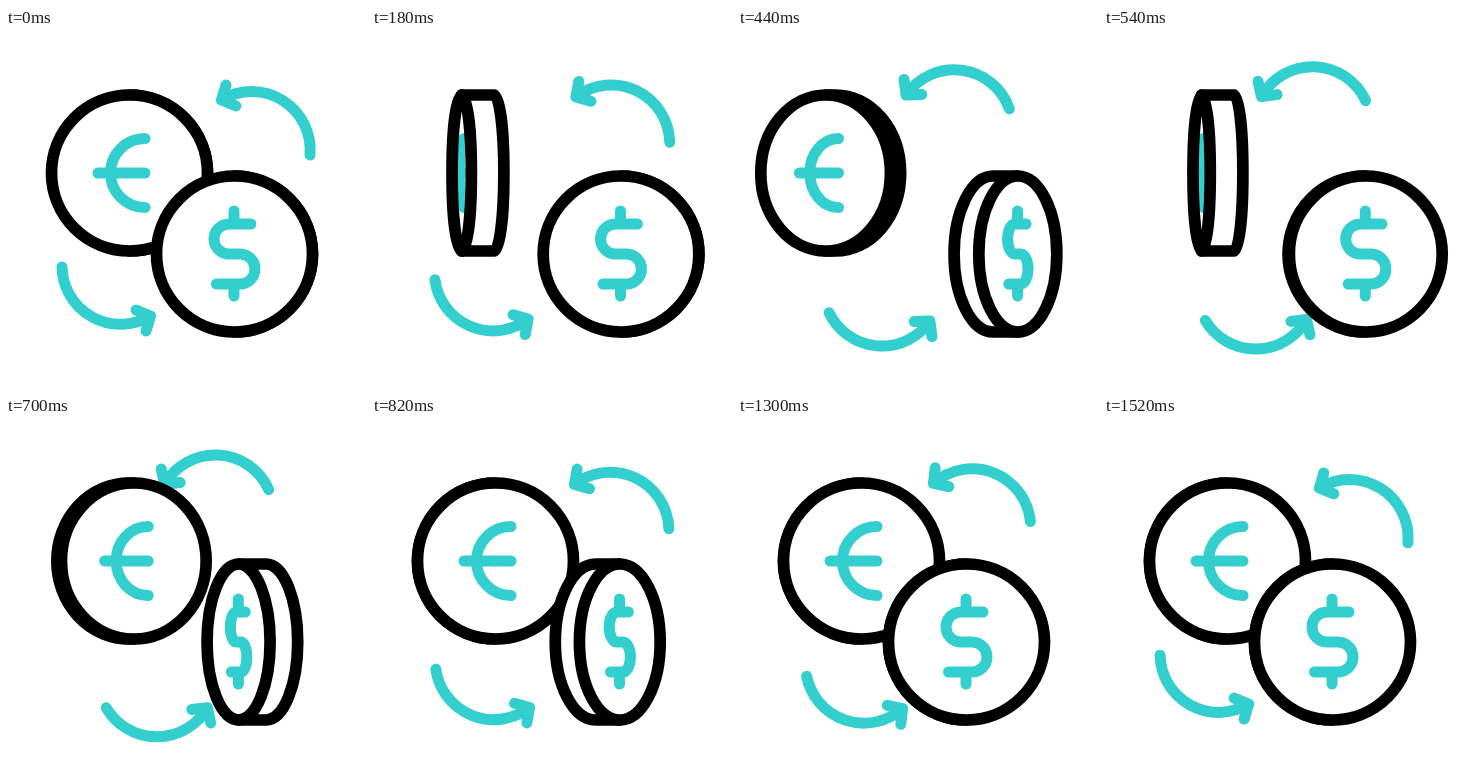
Recreate the animation shown at these times as an HTML page. Size 360x360 px, loop 2400 ms.

```html
<!DOCTYPE html>
<html lang="en">
<head>
<meta charset="utf-8">
<title>Currency exchange</title>
<style>
  html, body { margin: 0; width: 100%; height: 100%; overflow: hidden; background: #fff; }
  svg { display: block; width: 100vw; height: 100vh; }
  path, ellipse { stroke-linecap: round; stroke-linejoin: round; }
  .rim { fill: #fff; stroke: #000; stroke-width: 11.7; }
  .ring { fill: none; stroke: #000; stroke-width: 11.7; }
  .face { fill: #fff; }
  .mark { fill: none; stroke: #33cfcf; stroke-width: 11; vector-effect: non-scaling-stroke; }
</style>
</head>
<body>
<svg viewBox="0 0 360 360">
  <g id="arrows">
    <path class="mark" d="M304 127A58.5 58.5 0 0 0 215.5 72M220 57L215.5 72L230 78"/>
    <path class="mark" d="M56 239A58.5 58.5 0 0 0 144.5 288M140 303L144.5 288L130 282"/>
  </g>
  <g id="euro">
    <path class="rim"/>
    <ellipse class="face" ry="78"/>
    <path class="mark" d="M15.5 -34.5A34.5 34.5 0 0 0 15.5 34.5M-31.5 0H15.5"/>
    <ellipse class="ring" ry="78"/>
  </g>
  <g id="dollar">
    <path class="rim"/>
    <ellipse class="face" ry="78"/>
    <path class="mark" d="M16.5 -30H-5.5A15 15 0 0 0 -5.5 0H5.5A15 15 0 0 1 5.5 30H-18M-.5 -43V-30M-.5 30V42"/>
    <ellipse class="ring" ry="78"/>
  </g>
</svg>
<script>
  const LOOP = 2400, R = 78, DEPTH = 33;

  // Tracks are [time, value] pairs joined with ease-in-out.
  const swing = [[0, 0], [650, -32], [1010, 22.5], [1340, -11.7], [1530, 0]];
  const coins = [
    { id: 'euro', x: 123.5, y: 145, delay: 0, spin: 750,
      shift: [[0, 0], [375, -37], [640, 3], [800, 0]] },
    { id: 'dollar', x: 228.5, y: 226, delay: 172, spin: 785,
      shift: [[0, 0], [360, 40.8], [990, 0]] }
  ];

  const clamp = v => Math.min(1, Math.max(0, v));
  const smooth = v => v * v * (3 - 2 * v);

  function sample(track, t) {
    const i = track.findIndex(([time]) => time > t);
    if (i < 0) return track[track.length - 1][1];
    const [t0, a] = track[i - 1], [t1, b] = track[i];
    return a + (b - a) * smooth((t - t0) / (t1 - t0));
  }

  for (const coin of coins) {
    coin.el = document.getElementById(coin.id);
    coin.rim = coin.el.querySelector('.rim');
    coin.mark = coin.el.querySelector('.mark');
    coin.ovals = coin.el.querySelectorAll('ellipse');
  }
  const arrows = document.getElementById('arrows');

  function drawCoin(coin, t) {
    const turn = 2 * Math.PI * clamp((t - coin.delay) / coin.spin);
    const angle = turn - 0.07 * Math.sin(turn);
    const sin = Math.sin(angle), cos = Math.cos(angle);
    const squash = Math.max(0.002, Math.abs(cos));
    const rx = R * squash;
    // The rim shows on the right for the first half of each half turn.
    const side = sin * cos >= 0 ? 1 : -1;
    const depth = side * DEPTH * sin * sin;
    const face = -depth / 2, back = depth / 2;

    coin.el.setAttribute('transform', `translate(${coin.x + sample(coin.shift, t)} ${coin.y})`);
    coin.rim.setAttribute('d',
      `M${face} ${-R}H${back}A${rx} ${R} 0 0 ${side > 0 ? 1 : 0} ${back} ${R}H${face}`);
    coin.mark.setAttribute('transform', `translate(${face} 0) scale(${squash} 1)`);
    for (const oval of coin.ovals) {
      oval.setAttribute('cx', face);
      oval.setAttribute('rx', rx);
    }
  }

  function draw(t) {
    for (const coin of coins) drawCoin(coin, t);
    arrows.setAttribute('transform', `rotate(${sample(swing, t)} 180 180)`);
  }

  const start = performance.now();
  function tick() {
    draw((performance.now() - start) % LOOP);
    requestAnimationFrame(tick);
  }
  tick();
</script>
</body>
</html>
```
